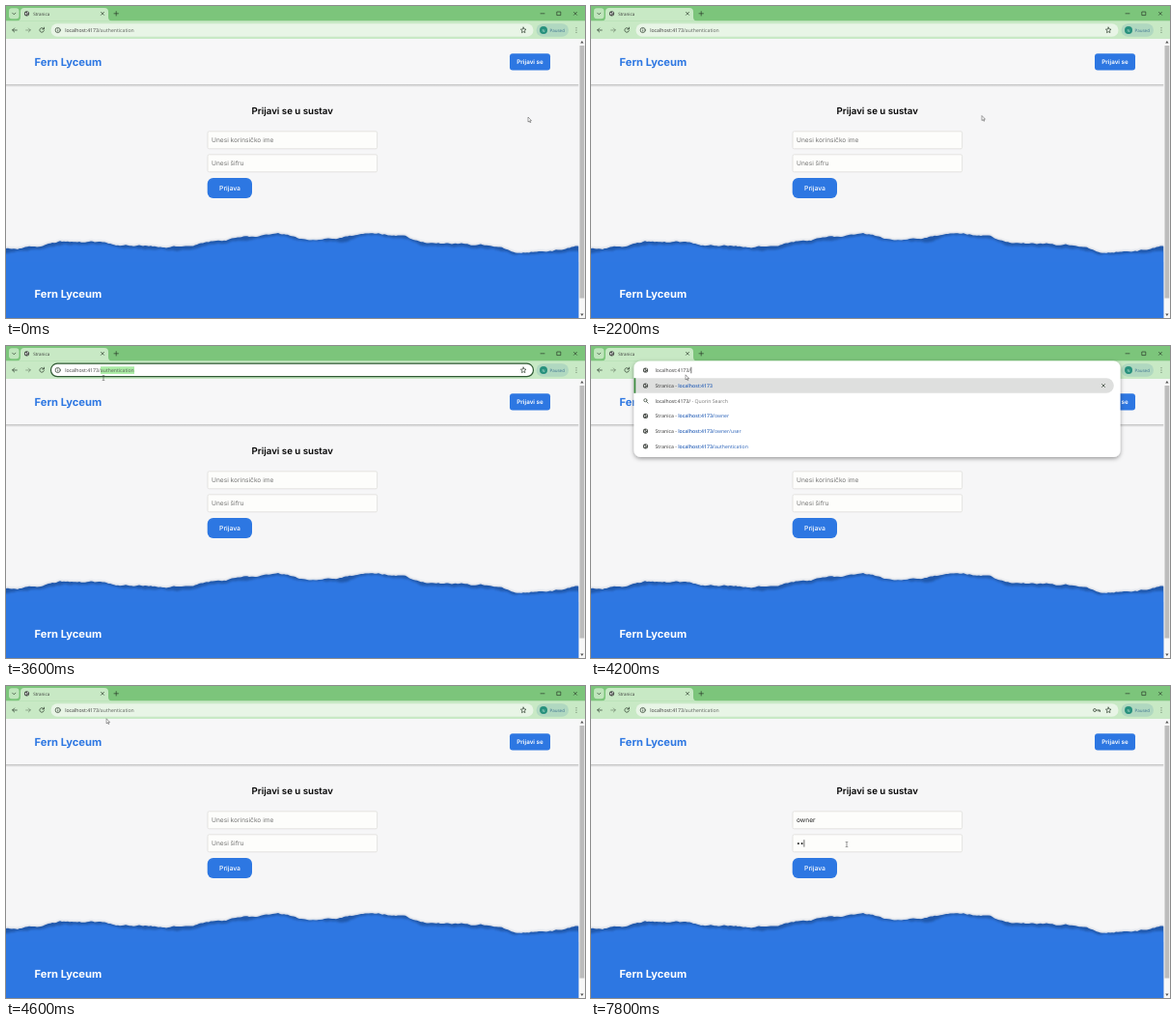
An HTML page for the animation above (8 s loop, 600 by 323 pixels).

```html
<!DOCTYPE html>
<html lang="hr">
<head>
<meta charset="utf-8">
<title>Stranica</title>
<style>
html, body { margin: 0; width: 100%; height: 100%; overflow: hidden; background: #f6f6f7; }
svg { display: block; width: 600px; height: 323px; }
text { font-family: Inter, Roboto, sans-serif; white-space: pre; text-rendering: geometricPrecision; }
.ui text { font: 5.16px "Open Sans", "Noto Sans", sans-serif; fill: #333; }
.ui .small { font-size: 4.5px; }
.ui .path { fill: #5c635c; }
.ui .grey { fill: #777; }
.ui .link { fill: #2a62b8; }
.ui .host { font-weight: 600; }
.line { fill: none; stroke: #2b3b2b; stroke-width: .7; stroke-linecap: round; stroke-linejoin: round; }
.logo { font-size: 11.2px; font-weight: 700; }
.field { fill: #fdfdfb; stroke: #dfdddb; stroke-width: .8; }
.entry { font-size: 6.6px; fill: #222; }
.hint { fill: #767676; }
.blue { fill: #2d77e2; }
.white { fill: #fff; }
</style>
</head>
<body>
<svg viewBox="0 0 600 323">
  <defs>
    <filter id="soft" x="-5%" y="-20%" width="110%" height="140%"><feGaussianBlur stdDeviation="1.2"/></filter>
    <filter id="drop" x="-5%" y="-10%" width="110%" height="130%">
      <feDropShadow dx="0" dy="1.5" stdDeviation="2" flood-color="#000" flood-opacity=".4"/>
    </filter>
    <linearGradient id="fade" x2="0" y2="1">
      <stop stop-color="#aaa" stop-opacity=".7"/><stop offset="1" stop-color="#aaa" stop-opacity="0"/>
    </linearGradient>
    <clipPath id="page"><rect y="34" width="593.5" height="289"/></clipPath>
    <g id="globe">
      <circle r="2.6" fill="#4a4f4a"/>
      <path d="M-1.8-.9l1.6.4.2 1.1-1 .8zM.5-1.9l1.2.9-.6 1-.8-.6zM.6.9l1 .1-.7 1z" fill="#eee"/>
    </g>
    <path id="cross" class="line" d="M-1.5-1.5l3 3m0-3l-3 3"/>
  </defs>

  <g clip-path="url(#page)">
    <rect y="34" width="600" height="289" fill="#f6f6f7"/>
    <rect y="81" width="600" height="3" fill="url(#fade)"/>
    <rect y="34" width="600" height="47" fill="#f7f7f8"/>
    <text class="logo blue" x="29.5" y="62">Fern Lyceum</text>
    <rect class="blue" x="522" y="49.3" width="42" height="17.3" rx="3"/>
    <text class="white" x="543" y="60.2" text-anchor="middle" font-size="6.3" font-weight="600">Prijavi se</text>
    <text x="296.7" y="112" text-anchor="middle" font-size="9.7" font-weight="600">Prijavi se u sustav</text>
    <rect class="field" x="209" y="129.8" width="175.6" height="18" rx="1.5"/>
    <rect class="field" x="209" y="153.8" width="175.6" height="18" rx="1.5"/>
    <text class="entry" id="user" x="213" y="141.2"></text>
    <text class="entry" id="pass" x="213" y="165.2"></text>
    <rect class="blue" x="208.7" y="178" width="46.3" height="21" rx="6"/>
    <text class="white" x="232" y="191" text-anchor="middle" font-size="6.8" font-weight="500">Prijava</text>
    <path id="shade" fill="#7d8fb3" opacity=".4" filter="url(#soft)"/>
    <path id="edge" fill="#2159ad"/>
    <path id="sea" class="blue" filter="url(#soft)"/>
    <rect class="blue" y="265" width="600" height="58"/>
    <text class="logo white" x="29.5" y="301.5">Fern Lyceum</text>
  </g>

  <g class="ui">
    <rect x="593.5" y="34" width="6.5" height="289" fill="#f7f7f7"/>
    <rect x="594.5" y="41" width="4.8" height="261.5" fill="#bcbcbc"/>
    <path d="M595.2 38.5l1.7-2.4 1.7 2.4zM595.2 318.5l1.7 2.4 1.7-2.4z" fill="#555"/>

    <rect width="600" height="20" fill="#7cc57b"/>
    <rect x="3" y="2.3" width="10.5" height="11" rx="3" fill="#bfe5bc"/>
    <path class="line" d="M6.7 7.2l1.6 1.6 1.6-1.6"/>
    <path d="M11 15.5q4 0 4-4V6q0-4 4-4h83q4 0 4 4v5.5q0 4 4 4z" fill="#c8e9c5"/>
    <rect y="15.3" width="600" height="18.7" fill="#c8e9c5"/>
    <use href="#globe" x="21.5" y="7.8"/>
    <text class="small" x="28.3" y="9.5">Stranica</text>
    <use href="#cross" x="100" y="7.8"/>
    <path class="line" d="M112 7.8h4.4M114.2 5.6V10M554 7.8h4M571.2 6h3.6v3.6h-3.6z"/>
    <use href="#cross" x="590" y="7.8"/>

    <path class="line" d="M11.3 25h-4.6m2-2l-2 2 2 2M39.2 23.8a2.3 2.3 0 1 0 .2 1.8m.1-3.4V24h-1.8"/>
    <path class="line" opacity=".55" d="M20.7 25h4.6m-2-2l2 2-2 2"/>
    <rect id="pill" x="46.5" y="18.2" width="500" height="13.5" rx="6.7" stroke-width="1.2"/>
    <circle class="line" cx="53.7" cy="25" r="2.6"/>
    <path class="line" d="M53.7 25v1.2M53.7 23.7v.1"/>
    <rect id="mark" y="21.3" height="7.6" fill="#a9eba3"/>
    <text x="61.2" y="26.9">localhost:4173<tspan class="path">/authentication</tspan></text>
    <path class="line" d="M536.2 22.1l.8 1.9 2 .2-1.5 1.4.4 2-1.7-1-1.7 1 .4-2-1.5-1.4 2-.2z"/>
    <path id="key" class="line" d="M523.5 25a1.5 1.5 0 1 0-3 0a1.5 1.5 0 1 0 3 0h4v1.5M526 25v1.2"/>
    <rect x="549.5" y="18.2" width="33.5" height="13.5" rx="6.7" fill="#b0d8c0"/>
    <circle cx="557" cy="25" r="4" fill="#26907c"/>
    <text class="small" x="557" y="26.5" text-anchor="middle" style="fill:#d7f0e4;font-size:4px">N</text>
    <text class="small" x="563.5" y="26.6" style="fill:#3d7390">Paused</text>
    <path class="line" stroke-width="1.3" d="M591 22.7v.1M591 25v.1M591 27.3v.1"/>

    <g id="menu">
      <rect x="44.5" y="15.5" width="504" height="99.5" rx="7" fill="#fff" filter="url(#drop)"/>
      <path d="M44.5 33.2H534a7.8 7.8 0 0 1 0 15.6H44.5z" fill="#dedfde"/>
      <rect x="44.5" y="33.2" width="1.8" height="15.6" fill="#3c8a3f"/>
      <use href="#globe" x="56.5" y="25"/>
      <text x="66.5" y="26.9">localhost:4173/</text>
      <rect x="103.6" y="21.8" width=".6" height="6.5" fill="#111"/>
      <use href="#cross" x="531" y="41"/>
      <g id="rows"></g>
    </g>
  </g>

  <rect id="caret" width=".6" height="7.4" fill="#111"/>
  <path id="arrow" d="M0 0v5.100l1.200-1.100.8 1.800.8-.4-.8-1.700h1.500z" fill="#fff" stroke="#444" stroke-width=".5"/>
  <path id="beam" d="M-1.3-2.6q1.3 0 1.3.6q0-.6 1.3-.6M0-2v4M-1.3 2.6q1.3 0 1.3-.6q0 .6 1.3.6" fill="none" stroke="#333" stroke-width=".5"/>
</svg>

<script>
const LOOP = 8000, STEP = 100;
const $ = id => document.getElementById(id);
const show = (id, on) => $(id).setAttribute('visibility', on ? 'visible' : 'hidden');
const set = (id, attrs) => Object.entries(attrs).forEach(([k, v]) => $(id).setAttribute(k, v));
const within = (t, a, b) => t >= a && t < b;
const clamp = (v, a, b) => Math.min(b, Math.max(a, v));
const ease = k => k * k * (3 - 2 * k);

// Suggestion rows
const hit = path => `Stranica - <tspan class="link"><tspan class="host">localhost:4173${path && '/'}</tspan>${path}</tspan>`;
const rows = [hit(''), 'localhost:4173/<tspan class="grey"> - Quorin Search</tspan>', hit('owner'), hit('owner/user'), hit('authentication')];
$('rows').innerHTML = rows.map((row, i) => {
  const y = 41 + i * 15.7;
  const icon = row.includes('Search')
    ? `<path class="line" d="M57.7 ${y + 1}l1.4 1.4M58 ${y - .5}a1.6 1.6 0 1 0-3.2 0a1.6 1.6 0 1 0 3.2 0"/>`
    : `<use href="#globe" x="56.5" y="${y}"/>`;
  return `${icon}<text x="66.5" y="${y + 1.9}">${row}</text>`;
}).join('');

// Torn paper edge: heights at even distances, roughened by seeded noise
const ridge = [252.5, 249, 244, 244, 248, 249, 249, 243, 239, 235, 241, 241, 234, 237, 246, 246, 248, 254, 254, 250];
const gap = 593 / (ridge.length - 1);
function height(x) {
  const i = clamp(Math.floor(x / gap), 0, ridge.length - 2);
  return ridge[i] + (ridge[i + 1] - ridge[i]) * ease(clamp(x / gap - i, 0, 1));
}
function torn(seed, shift, rough) {
  const rnd = () => (seed = seed * 16807 % 2147483647) / 2147483647 - .5;
  let d = 'M-10 330', drift = 0;
  for (let x = -10; x <= 610; x += 2) {
    drift = drift * .8 + rnd() * rough;
    d += `L${x} ${(height(x) + shift + drift).toFixed(1)}`;
  }
  return d + 'L610 330Z';
}
set('shade', { d: torn(23, -.8, 1.3) });
set('edge', { d: torn(23, 0, 1.3) });
set('sea', { d: torn(37, 3, 1.3) });

// Pointer: each glide starts at `t`, lasts `ms` and ends at x, y
const glides = [
  { t: 0, ms: 1, x: 541, y: 115 },
  { t: 500, ms: 1500, x: 405, y: 113.5 },
  { t: 2200, ms: 700, x: 140, y: 27 },
  { t: 3200, ms: 300, x: 101, y: 33 },
  { t: 3700, ms: 300, x: 98, y: 29.8 },
  { t: 4500, ms: 900, x: 275.5, y: 145 },
  { t: 6600, ms: 700, x: 265, y: 164 }
];
function pointer(t) {
  let { x, y } = glides[0];
  for (const g of glides) {
    const k = ease(clamp((t - g.t) / g.ms, 0, 1));
    x += (g.x - x) * k;
    y += (g.y - y) * k;
  }
  return { x, y };
}

// One key every 200 ms
const typed = (word, from, t) => word.slice(0, Math.max(0, Math.floor((t - from) / 200) + 1));

function entry(id, value, hint) {
  const el = $(id);
  el.textContent = value || hint;
  el.classList.toggle('hint', !value);
  return value ? el.getComputedTextLength() : 0;
}

function draw(t) {
  const { x, y } = pointer(t);
  const beam = within(t, 2900, 3800) || t >= 5400;
  show('arrow', !beam);
  show('beam', beam);
  for (const id of ['arrow', 'beam']) set(id, { transform: `translate(${x} ${y})` });

  const focus = within(t, 3000, 3800);
  set('pill', { fill: focus ? '#fff' : '#e8f5e6', stroke: focus ? '#2f5a33' : 'none' });
  const from = t < 3300 ? 61.2 : clamp(x - 3, 98, 133);
  show('mark', focus);
  set('mark', { x: from, width: 133 - from });
  show('menu', within(t, 3800, 4600));
  show('key', t >= 7600);

  const userEnd = entry('user', typed('owner', 5800, t), 'Unesi korinsičko ime');
  const passEnd = entry('pass', typed('••', 7600, t), 'Unesi šifru');
  const second = t >= 7400;
  show('caret', t >= 5500);
  set('caret', { x: 213.2 + (second ? passEnd : userEnd), y: second ? 159.2 : 135.2 });
}

let start;
function tick(now) {
  start ??= now;
  draw(Math.floor((now - start) % LOOP / STEP) * STEP);
  requestAnimationFrame(tick);
}
draw(0);
requestAnimationFrame(tick);
</script>
</body>
</html>
```
